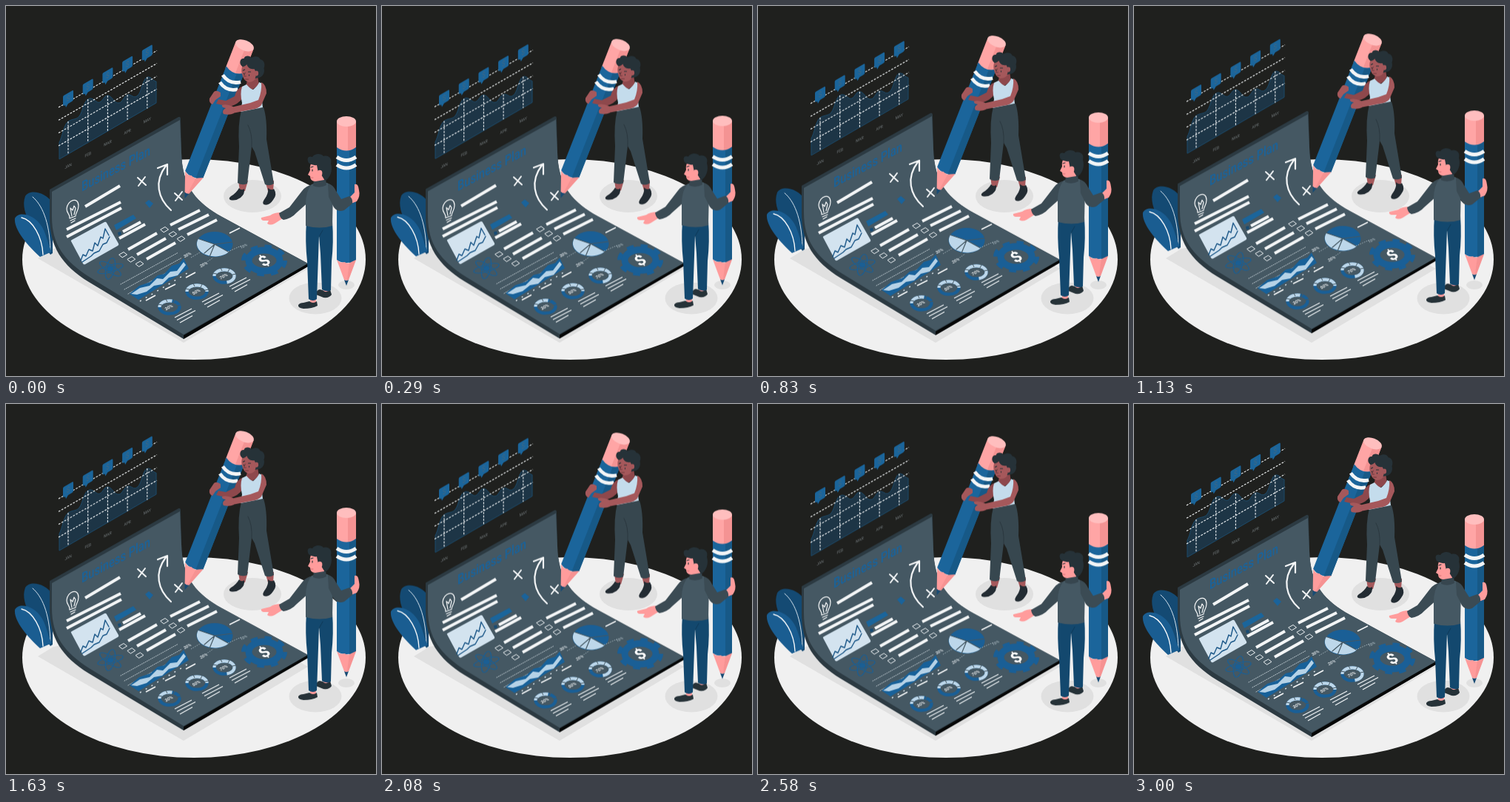
An HTML page for the animation above (3040 ms loop, 500x500 px).

```html
<!DOCTYPE html>
<html lang="en">
<head>
<meta charset="utf-8">
<title>Business Plan</title>
<style>
html, body { margin: 0; width: 100%; height: 100%; overflow: hidden; background: #1f201e; }
svg { display: block; width: 100vw; height: 100vh; }
.bob { animation: bob 3.04s ease-in-out infinite; }
@keyframes bob { 50% { transform: translateY(-9px); } }
text { font-family: Roboto, Arial, sans-serif; }
.line { fill: none; stroke-linecap: round; stroke-linejoin: round; }
.dash { stroke: #f2f5f6; stroke-width: 1.1; stroke-dasharray: 2.8 1.7; fill: none; }
</style>
</head>
<body>
<svg viewBox="0 0 500 500">
  <defs>
    <!-- origin at the tip, pointing down -->
    <g id="pencil">
      <path fill="#ffa5a5" d="M-13-222V-184Q0-175 13-184V-222Z"/>
      <path fill="#f08c8c" d="M2-215L13-222V-184Q9-180 2-179Z" opacity=".7"/>
      <ellipse cy="-222" rx="13" ry="7" fill="#ffbebe"/>
      <path fill="#1b659b" d="M-13-187Q0-178 13-187V-35Q8-31 0-31T-13-35Z"/>
      <path fill="#175987" d="M4-182Q10-184 13-187V-35Q9-31 4-31Z"/>
      <path fill="none" stroke="#f3f5f6" stroke-width="4.800" d="M-13-174Q0-165 13-174M-13-163.500Q0-154.500 13-163.500"/>
      <path fill="#ff9c9c" d="M-13-35Q-8-30-3-32Q4-29 7-32L13-35L3-8Q0-6-3-8Z"/>
      <path fill="#f08c8c" d="M4-31L13-35L3-8L1-8Z" opacity=".6"/>
      <path fill="#174b74" d="M-3-8Q0-6 3-8L0 0Z"/>
    </g>
  </defs>

  <ellipse cx="254" cy="342.500" rx="232" ry="135.500" fill="#f0f0f0"/>
  <g fill="#e0e0e0">
    <path d="M43 341L64 328L300 292L408 355L240 455Z"/>
    <ellipse cx="333" cy="257" rx="39" ry="22"/>
    <ellipse cx="418" cy="395" rx="35.500" ry="21.500"/>
    <ellipse cx="460" cy="377" rx="11" ry="6"/>
  </g>

  <g class="bob">
    <g id="leaves">
      <path fill="#144a73" d="M60 336C44 312 17 280 26 257C32 247 53 251 63 266V334Z"/>
      <path class="line" stroke="#d5e3ee" stroke-width="1" d="M36 258C48 268 59 290 60 331"/>
      <path fill="#1a5d91" d="M46 339C35 329 10 304 12 287C16 277 38 280 49 299C56 312 57 324 62 332Z"/>
      <path class="line" stroke="#fff" stroke-width="1.300" d="M21 286C36 289 49 312 50 336"/>
    </g>

    <g id="floating"></g>

    <g id="paper">
      <path fill="#2c3a42" d="M59 248L233 150Q236 149 236 153L237 198C238 245 258 266 292 285L408 348V352L240 450L112 373C75 350 59 325 59 285Z"/>
      <path fill="#455863" d="M62 251L235 154L237 198C238 245 258 266 292 285L408 348L240 444L114 367C78 344 62 322 62 285Z"/>
      <path fill="#060707" d="M240 445L408 348V352L240 450Z"/>
      <text transform="matrix(.84 -.45 0 1.080 102 251)" font-size="17.500" font-weight="500" fill="#1b639a">Business Plan</text>

      <g class="line" stroke="#f4f6f7" stroke-width="1.200">
        <path d="M86 287C87 281 82 281 82 274C83 262 98 257 98 270C98 277 94 279 94 284ZM87 290L94 287M88 293L93 290M89 284L87 273L90 276L92 270L94 273L92 282"/>
        <path stroke-width="2" d="M178 232L189 242M179 243L188 231M228 253L238 262M229 263L238 251"/>
        <path stroke-width="2.200" d="M223 276C205 260 200 237 216 216M205 219L218 214L218 228"/>
      </g>
      <path fill="#1b639a" d="M188 266L193 262L199 267L194 273Z"/>

      <path fill="#d3e3ef" d="M89 316L133 292Q135 291 136 293L152 321Q153 323 151 324L107 349Q105 350 104 348L88 318Q87 317 89 316Z"/>
      <path class="line" stroke="#1b5788" stroke-width="1.400" d="M101 344L104 336L108 338L112 329L117 331L120 320L124 324L128 312L131 314L134 301L139 310M103 346L115 338L119 334L126 331L131 322L136 320L140 312"/>
      <path fill="#1b659b" d="M146 296L172 282L176 287L149 303Z"/>
      <path fill="#174b74" d="M151 306L155 305L156 309L152 310Z"/>
      <g id="atom" class="line" stroke="#1b5f94" stroke-width="1.300"></g>

      <g id="bars" stroke="#f3f5f6" stroke-width="4"></g>
      <g id="boxes" class="line" stroke="#eef2f4" stroke-width="1"></g>

      <g id="area">
        <path class="line" stroke="#dfe7ec" stroke-width=".8" stroke-dasharray="1 1.700" d="M155 376L233 333M160 383L238 340M165 389L243 346"/>
        <path fill="#186199" d="M167 389L180 378L195 373L205 364L214 362L224 351L234 348L240 341L247 355L179 397Z"/>
        <path fill="#b5d2e7" d="M169 389L181 381L194 378L204 368L212 369L222 359L231 358L240 346L243 350L232 364L220 367L211 376L200 378L190 386L177 390Z"/>
        <path stroke="#f3f5f6" stroke-width="1.800" d="M189 398L202 391M215 383L229 376M243 367L256 360"/>
        <path stroke="#dfe7ec" stroke-width="1.500" stroke-dasharray="2 7" d="M181 399L250 358"/>
      </g>

      <g id="pie">
        <ellipse cx="282" cy="322" rx="24.500" ry="17" fill="#1a5f96"/>
        <path fill="#bdd7ea" d="M282 322L260 314.500A24.500 17 0 0 0 301 332.500Z"/>
        <path class="line" stroke="#455863" stroke-width="1.200" d="M282 322L260 314.500M282 322L275 339M282 322L302 333M282 322L306 319M282 322L268 334"/>
        <path stroke="#f3f5f6" stroke-width="1.600" d="M302 307L316 300"/>
        <path stroke="#a9b8c0" stroke-width=".9" stroke-dasharray="1.500 1.500" d="M250 340L262 333M270 347L280 340M300 332L318 324"/>
      </g>

      <g id="gear">
        <ellipse cx="349" cy="344" rx="28" ry="18.500" fill="none" stroke="#1a5f96" stroke-width="6" stroke-dasharray="9.300 9.170"/>
        <ellipse cx="349" cy="344" rx="21" ry="14" fill="#455863" stroke="#1a5f96" stroke-width="9"/>
        <text transform="matrix(.87 -.5 .6 .72 348 353)" font-size="22" font-weight="700" fill="#fff">$</text>
      </g>
      <g id="donuts"></g>
      <g id="shares" fill="#e8edf0"></g>
    </g>

    <use href="#pencil" transform="translate(241.500 260) rotate(21.400)"/>

    <g id="woman">
      <path fill="#a5585b" d="M314 236H327L323 250H316ZM350 236H362L361 250H354Z"/>
      <path fill="#232c33" d="M315 246Q318 250 322 247Q323 254 317 259Q310 264 303 262Q300 260 304 257Q311 253 315 246ZM354 246Q359 250 362 247Q367 255 361 262Q355 271 348 268Q346 265 350 260Q355 253 354 246Z"/>
      <path fill="#37474f" d="M318 141L348 137Q353 152 352 180L362 240Q356 244 350 241L336 197L332 190L326 240Q319 243 313 239L315 190Q313 160 318 141Z"/>
      <path class="line" stroke="#2b383f" stroke-width="1" d="M332 190Q333 172 327 161"/>
      <path fill="#8e484c" d="M321 108Q312 110 309 122L297 128L287 126L284 132L302 136Q314 133 320 124Z"/>
      <path fill="#8e484c" d="M328 94L340 94L342 107L331 114L324 108Z"/>
      <path fill="#c4dcec" d="M319 109L325 106Q331 113 334 113Q341 107 342 103L347 105Q350 118 346 129L347 137L317 143L319 131Q316 118 319 109Z"/>
      <path fill="#a5585b" d="M345 103Q352 106 352 118L345 134Q341 139 331 140L306 145L304 137L330 131L341 127Q346 115 345 103Z"/>
      <path fill="#a5585b" d="M307 136Q298 132 292 134Q291 137 297 138Q291 141 294 146Q302 148 308 145Z"/>
      <path fill="#a5585b" d="M290 117Q284 113 281 116L275 125Q274 131 279 133L283 127L290 122Z"/>
      <g transform="translate(-.5 2)">
        <path fill="#a5585b" d="M322 74Q318 82 319 88Q321 99 328 101Q337 101 340 92L339 76Z"/>
        <path fill="#263238" d="M319 79C315 75 317 68 322 69C323 64 331 65 332 68C337 65 343 66 344 70C350 71 351 78 349 82C351 88 347 95 341 95L337 96Q340 89 336 83C331 84 327 81 326 77C323 80 320 81 319 79Z"/>
        <ellipse cx="339" cy="89" rx="2.600" ry="3.400" fill="#a5585b"/>
        <path class="line" stroke="#263238" stroke-width="1.200" d="M321 85L323 84M328 87L331 87M322 89V90M329 91V92"/>
        <path class="line" stroke="#743a3e" stroke-width="1" d="M324 88L322 93L325 93M324 97L328 97"/>
      </g>
    </g>

    <use href="#pencil" transform="translate(460 378)"/>

    <g id="man">
      <path fill="#ff9c9c" d="M411 390H419V402H411ZM429 378H438V388H429Z"/>
      <path fill="#263238" d="M410 399Q415 403 420 399L421 405Q414 409 402 409Q394 408 395 404Q397 401 402 401ZM428 384Q433 389 438 383L440 390Q437 395 429 394L419 390Q419 384 424 383Z"/>
      <path fill="#13486e" d="M406 291H441Q443 320 440 345L439 384Q433 387 427 383L425 335L423 310L420 396Q415 400 409 396L407 345Q404 318 406 291Z"/>
      <path class="line" stroke="#0f3a59" stroke-width="1" d="M423 312L428 303"/>
      <path fill="#ff9c9c" d="M372 279Q362 279 357 283L345 286Q344 289 348 290L355 290L353 294Q357 297 363 294L374 287Z"/>
      <path fill="#3b4b54" d="M415 241Q405 243 400 250L383 272L369 280Q370 287 375 289Q386 287 393 279L411 263Z"/>
      <path fill="#455863" d="M413 241Q424 236 434 239Q441 242 442 250L441 297Q424 302 405 297L405 268Q405 250 413 241Z"/>
      <path fill="#ff9c9c" d="M471 241Q476 239 477 249Q479 257 474 264L466 267L464 259L471 252Z"/>
      <path fill="#3b4b54" d="M435 240Q442 241 446 250L453 261L464 257Q469 260 468 267L457 276Q448 279 443 272L436 258Z"/>
      <path fill="#37464f" d="M416 235L432 233L433 242Q424 247 415 243Z"/>
      <path fill="#ff9c9c" d="M413 211Q410 217 411 222L408 228L411 230Q411 237 418 237L430 235L434 218L426 208Z"/>
      <path fill="#263238" d="M409 212C406 206 408 202 414 204C418 198 427 200 429 203C437 201 441 207 439 213C442 222 438 233 431 236L426 228L422 225L420 215Q414 216 409 212Z"/>
      <ellipse cx="424" cy="226" rx="3.400" ry="4.200" fill="#ff9c9c"/>
      <path class="line" stroke="#263238" stroke-width="1.200" d="M412 218L415 217M414 221V223"/>
      <path class="line" stroke="#d86f72" stroke-width="1" d="M412 232L415 232"/>
    </g>
  </g>
</svg>
<script>
const put = (id, html) => { document.getElementById(id).innerHTML = html; };
const range = n => [...Array(n).keys()];

// Floating chart: columns and guides share one slope
const slope = .577;
const months = ['JAN', 'FEB', 'MAR', 'APR', 'MAY'];
const peaks = [156, 126, 121, 120, 96];
let chart = `<path fill="#1d3546" stroke="#1d4b6b" stroke-width="1"
  d="M72 184C76 178 78 160 84 156C90 152 95 154 99 149C104 143 105 126 113 125
  C119 124 122 132 127 130C132 127 132 121 138 121C144 122 146 132 153 131
  C158 130 159 121 165 120C170 119 172 126 178 121C184 115 185 96 192 96C197 96 198 101 203 102V131L72 207Z"/>`;
chart += range(4).map(i => {
  const y = 137 + i * 17.3;
  return `<path class="dash" d="M71 ${y}L204 ${y - 133 * slope}"/>`;
}).join('');
chart += months.map((name, i) => {
  const x = 84 + i * 26.7, dy = -i * 26.7 * slope;
  return `<path class="dash" d="M${x} ${peaks[i]}V${200 + dy}"/>
  <g transform="translate(${x} ${124 + dy})">
    <path fill="#1b659b" d="M-6-3L6-10Q7-10 7-9V2Q7 4 5 5L0 8L-3 13L-4 10L-6 11Q-7 11-7 9V-1Q-7-2-6-3Z"/>
    <text transform="matrix(.866 -.5 0 1 0 4)" text-anchor="middle" font-size="10" fill="#3f6784">$</text>
  </g>
  <text transform="matrix(.866 -.42 0 1 ${x} ${218 + dy})" text-anchor="middle" font-size="5.600" fill="#747b7e">${name}</text>`;
}).join('');
put('floating', chart);

// Written lines: x1, y1, x2, y2
const bars = [
  [107, 271, 154, 243], [82, 302, 155, 265], [82, 312, 156, 273],
  [158, 305, 182, 292], [153, 314, 188, 295],
  [165, 329, 204, 307], [177, 336, 216, 314], [190, 342, 229, 320],
  [222, 296, 262, 276], [233, 302, 274, 282], [245, 309, 285, 289]
];
put('bars', bars.map(([a, b, c, d]) => `<path d="M${a} ${b}L${c} ${d}"/>`).join(''));

put('boxes', [[158, 336], [214, 302]].map(([x, y]) => range(3).map(i =>
  `<path d="M${x - 5 + i * 11.2} ${y + i * 6.2}l6-3.500 4.500 3.500-6 3.700Z"/>`).join('')).join(''));

put('atom', [0, 60, 120].map(a =>
  `<ellipse rx="18" ry="6" transform="translate(141 355) scale(1 .8) rotate(${a - 20})"/>`).join('') +
  '<ellipse cx="141" cy="355" rx="4" ry="3" fill="#1b5f94"/>');

// Text lying on the floor plane
const flat = (x, y, size, s) =>
  `<text transform="matrix(.87 -.46 .45 .8 ${x} ${y})" text-anchor="middle" font-size="${size}" font-weight="500">${s}</text>`;

put('donuts', [30, 50, 70].map((share, i) => `<g transform="translate(${221 + i * 37} ${407 - i * 21})">
  <ellipse rx="13.500" ry="8.700" fill="none" stroke="#1a5f96" stroke-width="4.200"/>
  <ellipse rx="13.500" ry="8.700" fill="none" stroke="#bdd7ea" stroke-width="4.200"
    pathLength="100" stroke-dasharray="${share} 100" transform="rotate(180)"/>
  <path stroke="#455863" stroke-width="1" d="M-16-4L-10-3M-5-11L-3-7M7-10L5-6M16-3L11-2"/>
  <g fill="#fff">${flat(0, 2, 6.3, share + '%')}</g>
  <path stroke="#eef2f4" stroke-width="1.300" d="M7 14L30 2M10 17.500L35 4.500M14 21L31 11.500"/>
</g>`).join(''));

put('shares', flat(246, 338, 6, '30%') + flat(268, 351, 6, '20%') +
  `<g fill="#a9b8c0">${flat(322, 326, 5.5, '10%')}</g>`);
</script>
</body>
</html>
```
